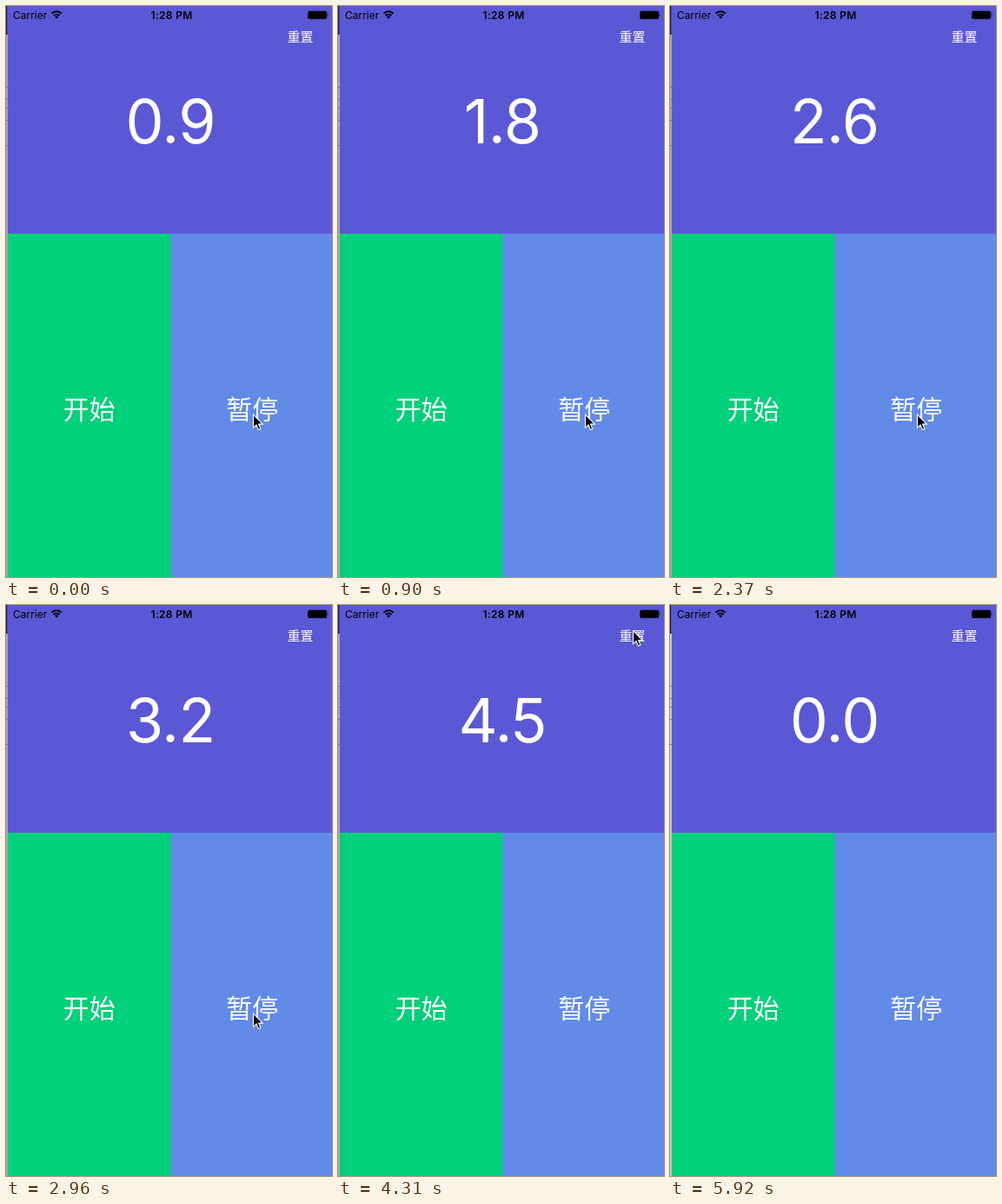
These frames come from a looping animation (375x657 px, 6020 ms). An HTML page:

```html
<!DOCTYPE html>
<html lang="zh-CN">
<head>
<meta charset="utf-8">
<style>
  html, body { margin: 0; width: 100%; height: 100%; overflow: hidden; }
  svg { display: block; width: 375px; height: 657px; }
  text { font-family: Inter, sans-serif; text-anchor: middle; fill: #fff; }
  .status { font-size: 12px; fill: #000; }
  .label { font-family: "Noto Sans CJK SC", "Noto Sans CJK", sans-serif; font-size: 30px; }
</style>
</head>
<body>
<svg viewBox="0 0 375 657">
  <rect id="edge" width="2" height="657"/>
  <rect width="2" height="262" x="1.5" fill="#5b58d6"/>
  <rect y="33" x="1" width="1" height="229" fill="#a8a8a8" id="edgeInner"/>
  <rect width="1.5" height="33" fill="#1b1745"/>
  <path d="M0 93.5h2M0 107.5h2M0 117.5h2M0 131.5h2M0 160.5h2" stroke="#777"/>
  <rect x="2" width="373" height="262" fill="#5b58d6"/>
  <rect x="2" y="262" width="373" height="395" fill="#628be8"/>
  <rect x="2" y="262" width="187.5" height="395" fill="#00d07a"/>

  <text class="status" x="8" y="14.5" style="text-anchor:start">Carrier</text>
  <g fill="none" stroke="#000" stroke-width="1.9">
    <path d="M52.6 8.6a8 8 0 0 1 11.2 0M54.8 11a5 5 0 0 1 6.8 0"/>
    <path d="M56.2 12.4a2.8 2.8 0 0 1 4 0L58.2 14.7z" fill="#000" stroke="none"/>
  </g>
  <text class="status" x="190.6" y="14.5" font-weight="600" letter-spacing=".3">1:28 PM</text>
  <rect x="347.5" y="6" width="21.3" height="8.8" rx="1.5" stroke="#000" stroke-opacity=".5"/>
  <path d="M369.8 8.5q1.8 1.9 0 3.8z"/>

  <text id="reset" class="label" x="338.5" y="40.5" style="font-size:15px">重置</text>
  <text id="counter" x="189.2" y="158.2" font-size="70" letter-spacing="-.7"></text>
  <text class="label" x="95.7" y="475">开始</text>
  <text id="toggle" class="label" x="283.2" y="475"></text>
  <path id="cursor" d="M0 0V15.3L3.5 12L6 17.6L8.4 16.6L6 11.1H10.8Z" stroke="#fff" stroke-width="1.1"/>
</svg>
<script>
const LOOP = 6.02, REFRESH = 0.1483;
const PAUSE = 1.3, RESUME = 1.9, RESET = 4.7;
const $ = id => document.getElementById(id);
const lerp = (a, b, u) => a + (b - a) * u;

// Smooth 0 to 1 between two moments
function ease(s, from, to) {
  const u = Math.min(1, Math.max(0, (s - from) / (to - from)));
  return u * u * (3 - 2 * u);
}

// From the toggle up to the reset label in a bow, then out at the bottom
function pointerAt(s) {
  const rise = ease(s, 3.46, 4.12), leave = ease(s, 4.65, 5.69);
  const x = lerp(284.5, 339.5, Math.sqrt(rise)) + 12 * Math.sin(Math.PI * rise);
  return [lerp(x, 298, leave), lerp(lerp(470, 29.5, rise), 670, leave)];
}

function secondsAt(s) {
  if (s < RESUME) return Math.min(s + 0.9, 2.1);
  return s < RESET ? s + 0.23 : 0;
}

// A tapped title is dimmed for one refresh
const titleOpacity = (s, ...taps) => taps.some(tap => s >= tap && s < tap + 0.14) ? 0.5 : 1;

function draw(now) {
  const t = (now / 1000) % LOOP;
  const s = Math.floor((t + 0.012) / REFRESH) * REFRESH;
  $('counter').textContent = secondsAt(s).toFixed(1);
  $('toggle').textContent = s > PAUSE && s < RESUME ? '继续' : '暂停';
  $('toggle').style.opacity = titleOpacity(s, PAUSE, RESUME);
  $('reset').style.opacity = titleOpacity(s, RESET);
  $('cursor').setAttribute('transform', `translate(${pointerAt(s)})`);
  for (const id of ['edge', 'edgeInner'])
    $(id).setAttribute('fill', s > 5.9 ? '#c8c8c8' : '#a8a8a8');
  requestAnimationFrame(() => draw(performance.now() - start));
}

const start = performance.now();
draw(0);
</script>
</body>
</html>
```
